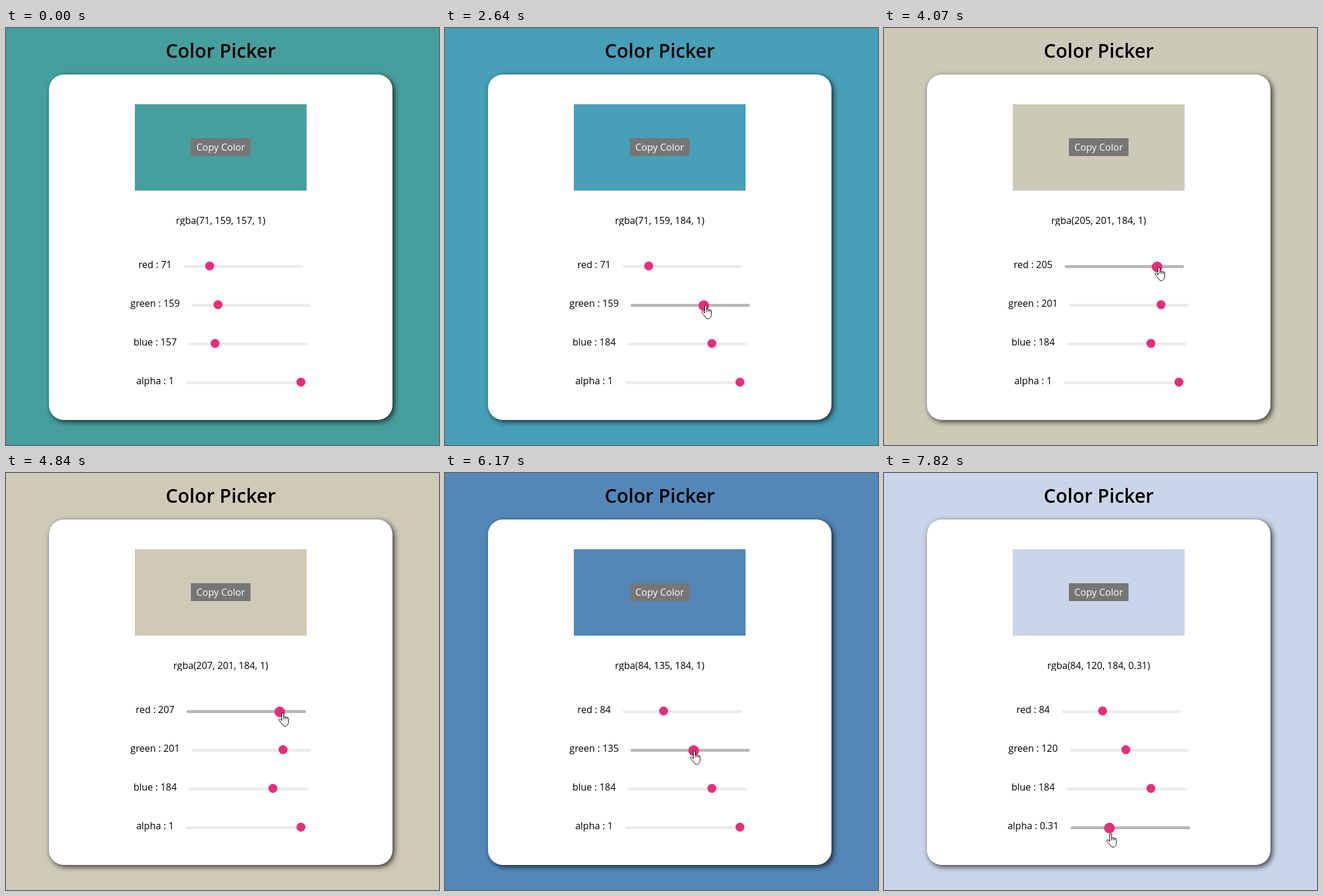
An HTML page that plays this animation: 726x700 px, repeating every 8000 ms.

```html
<!DOCTYPE html>
<html lang="en">
<head>
<meta charset="utf-8">
<title>Color Picker</title>
<style>
  html, body { margin: 0; width: 100%; height: 100%; overflow: hidden; }
  body { background: #fff; font: 16px/24px "Open Sans", sans-serif; color: #000; }
  .stage { position: absolute; left: 0; top: 0; width: 726px; height: 700px; overflow: hidden; background: var(--color); }
  .stage > * { position: absolute; box-sizing: border-box; }
  h1 { left: 0; top: 16px; width: 720px; margin: 0; text-align: center; font-size: 32px; font-weight: 600; line-height: 44px; }
  .card { left: 72px; top: 78px; width: 576px; height: 580px; border-radius: 25px; background: #fff; box-shadow: 3px 3px 10px rgba(0, 0, 0, .75); }
  .preview { left: 216px; top: 128px; width: 288px; height: 145px; background: var(--color); }
  .copy { left: 310px; top: 185px; width: 100px; height: 30px; background: #767676; color: #fff; text-align: center; line-height: 30px; }
  .code { left: 72px; top: 311px; width: 576px; height: 21px; overflow: hidden; text-align: center; }
  .row { left: 0; width: 720px; height: 24px; display: flex; justify-content: center; white-space: pre; }
  .slider { position: relative; width: 200px; height: 24px; margin-left: 20px; }
  .track { position: absolute; top: 13px; width: 200px; height: 5px; border-radius: 3px; background: #ececec; }
  .thumb { position: absolute; top: 7px; width: 15px; height: 15px; border-radius: 50%; background: #e62e7b; }
  .hover .track { background: #bbb7b7; }
  .hover .thumb { width: 18px; height: 18px; }
  .cursor { left: 0; top: 0; width: 20px; height: 26px; overflow: visible; fill: #fff; stroke: #000; stroke-linejoin: round; }
</style>
</head>
<body>
<div class="stage">
  <h1>Color Picker</h1>
  <div class="card"></div>
  <div class="preview"></div>
  <div class="copy">Copy Color</div>
  <div class="code"></div>
  <svg class="cursor">
    <path class="arrow" d="M.5 .5V16.5L4.2 13 6.8 18.5 9 17.5 6.6 12.3H11.7Z"/>
    <g class="hand" transform="translate(-6 0)">
      <path d="M5.5 13.5V2a1.6 1.6 0 0 1 3.2 0V7.2q1.4-1.1 2.7.6 1.6-1 2.7.7 2.4-.7 2.6 1.6V15C16.7 18 15.3 23.2 11 23.2Q8 23.2 6.5 20L.9 13.2Q0 11.3 1.5 10.6 3 10.2 5.5 13.5Z"/>
      <path d="M8.7 7.2v4.3M11.4 7.8v3.7M14.1 8.5v3" fill="none"/>
    </g>
  </svg>
</div>
<script>
const LOOP = 8000, STEP = 110;

// Keys are [step, value]; a slider's knob rests at 50 until first dragged.
const channels = [
  { name: 'red', start: 71, max: 255, hover: [[31, 49]],
    keys: [[32, 52], [34, 119], [36, 163], [37, 205], [40, 242], [43, 242], [44, 207], [46, 100], [48, 84]] },
  { name: 'green', start: 159, max: 255, hover: [[21, 27], [52, 59]],
    keys: [[22, 120], [24, 159], [26, 201], [53, 201], [56, 135], [57, 120]] },
  { name: 'blue', start: 157, max: 255, hover: [[11, 18]],
    keys: [[11, 159], [15, 177], [17, 184]] },
  { name: 'alpha', start: 1, max: 1, hover: [[66, 72]],
    keys: [[67, 1], [71, .31]] }
];

// Pointer path: [step, x, y]
const path = [
  [1, 557, 661], [3, 430, 606], [5, 352, 550], [6, 362, 537], [8, 417, 540], [9, 426, 540], [10, 426, 540],
  [11, 428, 527], [15, 442, 525], [17, 448, 526], [18, 448, 526], [20, 415, 490], [21, 406, 468], [22, 407, 466],
  [24, 436, 465], [26, 467, 466], [27, 467, 466], [30, 360, 418], [31, 347, 402], [32, 347, 402], [36, 431, 402],
  [37, 460, 401], [40, 487, 402], [43, 487, 402], [44, 463, 402], [46, 383, 402], [48, 369, 402], [49, 369, 402],
  [52, 464, 468], [53, 466, 467], [56, 417, 466], [57, 408, 466], [59, 409, 468], [63, 470, 657], [64, 480, 657],
  [66, 490, 602], [67, 494, 596], [71, 379, 605]
];

const $ = selector => document.querySelector(selector);
const stage = $('.stage'), code = $('.code'), cursor = $('.cursor');

function sample(keys, step, i = 1) {
  const next = keys.findIndex(key => key[0] > step);
  if (next === 0) return keys[0][i];
  if (next < 0) return keys[keys.length - 1][i];
  const a = keys[next - 1], b = keys[next];
  return a[i] + (b[i] - a[i]) * (step - a[0]) / (b[0] - a[0]);
}

channels.forEach((channel, i) => {
  const row = document.createElement('div');
  row.className = 'row';
  row.style.top = 385 + 65 * i + 'px';
  row.innerHTML = '<span></span><div class="slider"><div class="track"></div><div class="thumb"></div></div>';
  stage.insertBefore(row, cursor);
  channel.row = row;
  channel.label = row.querySelector('span');
  channel.thumb = row.querySelector('.thumb');
});

function draw(step) {
  let hovering = false;
  const values = channels.map(({ name, start, max, hover, keys, row, label, thumb }) => {
    const touched = step >= keys[0][0];
    const raw = touched ? sample(keys, step) : start;
    const value = max === 1 ? Number(raw.toFixed(2)) : Math.round(raw);
    const active = hover.some(([from, to]) => step >= from && step <= to);
    const part = touched || max === 1 ? value / max : 50 / 255;
    row.classList.toggle('hover', active);
    label.textContent = `${name} : ${value}`;
    thumb.style.left = (active ? 182 : 185) * part + 'px';
    hovering ||= active;
    return value;
  });
  const color = `rgba(${values.join(', ')})`;
  code.textContent = color;
  const [r, g, b, a] = values;
  const solid = [r, g, b].map(v => Math.round(255 + (v - 255) * a));
  stage.style.setProperty('--color', `rgb(${solid})`);

  cursor.style.display = step < 1 ? 'none' : 'block';
  cursor.style.transform = `translate(${Math.round(sample(path, step, 1))}px, ${Math.round(sample(path, step, 2))}px)`;
  $('.hand').style.display = hovering ? '' : 'none';
  $('.arrow').style.display = hovering ? 'none' : '';
}

const begin = performance.now();
let shown = -1;
function tick() {
  const time = (performance.now() - begin) % LOOP;
  const step = Math.floor((time + 10) / STEP);
  if (step !== shown) draw(shown = step);
  requestAnimationFrame(tick);
}
tick();
</script>
</body>
</html>
```
